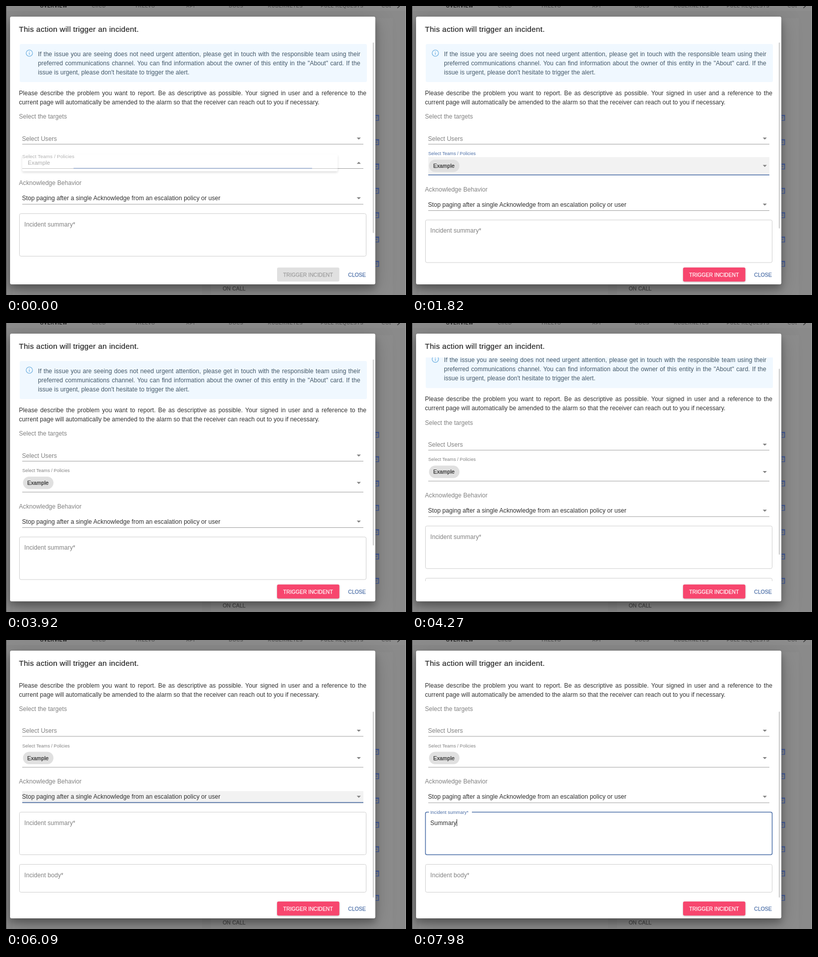
Animation of 788x570 px, one loop 8 s. Source, as an HTML page:

```html
<!DOCTYPE html>
<html lang="en">
<head>
<meta charset="utf-8">
<title>Trigger an incident</title>
<style>
  html, body { margin: 0; width: 100%; height: 100%; overflow: hidden; background: #8a8a8a; }
  svg { display: block; font: 12px "Liberation Sans", Arial, sans-serif; letter-spacing: .065px; }
  text { white-space: pre; }
  .ink { fill: #303030; }
  .hint { fill: #808080; }
  .tab { font-size: 9px; font-weight: 700; letter-spacing: .7px; fill: #585858; }
  .action { font-size: 10.25px; letter-spacing: 0; stroke-width: .25px; }
  .rule { stroke: #a0a0a0; }
  .focus { stroke: #4c6fa8; stroke-width: 1.5; }
  .box { fill: none; stroke: #d0d0d0; }
  .arrow { fill: #808080; }
  .paper { fill: #fff; filter: drop-shadow(0 3px 2.5px rgba(0,0,0,.32)); }
  .lines div { line-height: 18px; height: 18px; white-space: nowrap; text-align: justify; text-align-last: justify; }
  .lines div:last-child { text-align-last: left; }
</style>
</head>
<body>
<svg width="788" height="570" viewBox="0 0 788 570">
  <defs>
    <clipPath id="viewport"><rect x="8" y="68" width="719" height="441"/></clipPath>
    <clipPath id="tabStrip"><rect width="758" height="12"/></clipPath>
    <path id="down" class="arrow" d="M-4-1.9H4L0 2.1Z"/>
    <g id="exit" fill="none" stroke="#3f5285" stroke-width="1.6">
      <path d="M0-5H6.2V5H0"/><path d="M0-4.2H6" stroke-width="2.4"/><path d="M0 0H3.4"/>
    </g>
  </defs>

  <g id="page">
    <rect width="788" height="570" fill="#8a8a8a"/>
    <rect width="788" height="10" fill="#8d8d8d"/>
    <rect x="13" y="24" width="373" height="546" fill="#8d8d8d"/>
    <rect x="404" y="24" width="358" height="546" fill="#8d8d8d"/>
    <rect width="1" height="570" fill="#505050"/>
    <rect x="787" width="1" height="570" fill="#a0a0a0"/>
    <g id="tabs" clip-path="url(#tabStrip)"></g>
    <path d="M771-3L775 .5L771 4" fill="none" stroke="#333" stroke-width="1.4"/>
    <text x="427" y="560.5" font-size="10.25" style="letter-spacing:.15px" fill="#484848" stroke="#484848" stroke-width=".25">ON CALL</text>
  </g>

  <rect x="8" y="21" width="719.5" height="528" rx="3" fill="#fff"
        style="filter:drop-shadow(0 8px 7px rgba(0,0,0,.28)) drop-shadow(0 10px 20px rgba(0,0,0,.22))"/>
  <g id="exits"></g>
  <text x="25.5" y="51" font-size="15" style="letter-spacing:.3px" fill="#262626" stroke="#262626" stroke-width=".22">This action will trigger an incident.</text>

  <g clip-path="url(#viewport)">
    <g id="content">
      <rect x="27" y="75" width="684" height="75" rx="3" fill="#f0f8ff"/>
      <g fill="none" stroke="#64aade" stroke-width="1.1">
        <circle cx="46" cy="93" r="6.3"/><path d="M46 92V96.3M46 89.4V90.8"/>
      </g>
      <foreignObject x="63" y="86" width="635" height="56">
        <div xmlns="http://www.w3.org/1999/xhtml" class="lines" style="color:#435868">
          <div>If the issue you are seeing does not need urgent attention, please get in touch with the responsible team using their</div>
          <div>preferred communications channel. You can find information about the owner of this entity in the "About" card. If the</div>
          <div>issue is urgent, please don't hesitate to trigger the alert.</div>
        </div>
      </foreignObject>
      <foreignObject x="25.5" y="162.5" width="684.5" height="38">
        <div xmlns="http://www.w3.org/1999/xhtml" class="lines" style="color:#303030">
          <div>Please describe the problem you want to report. Be as descriptive as possible. Your signed in user and a reference to the</div>
          <div>current page will automatically be amended to the alarm so that the receiver can reach out to you if necessary.</div>
        </div>
      </foreignObject>
      <text class="hint" x="25.5" y="222.2">Select the targets</text>

      <text class="hint" x="31.5" y="265.7">Select Users</text>
      <path class="rule" d="M32 272.5H704"/>
      <use href="#down" x="695" y="261.5"/>

      <rect id="teamsFill" x="32" y="298" width="672" height="35" fill="#f2f2f2"/>
      <g id="chip">
        <rect x="33.5" y="303" width="60" height="24.5" rx="12.2" fill="#e0e0e0"/>
        <text x="42" y="319" font-size="10.5" style="letter-spacing:.15px" fill="#2b2b2b" stroke="#2b2b2b" stroke-width=".25">Example</text>
      </g>
      <text id="teamsLabel">Select Teams / Policies</text>
      <path id="teamsRule" class="rule"/>
      <path id="teamsFocus" class="focus"/>
      <use id="teamsArrow" href="#down"/>

      <g id="lower">
        <text class="hint" x="25.5" y="365.7">Acknowledge Behavior</text>
        <rect id="ackFill" x="32" y="380.5" width="672" height="23" fill="#f2f2f2"/>
        <text class="ink" x="31.5" y="395.7">Stop paging after a single Acknowledge from an escalation policy or user</text>
        <path class="rule" d="M32 403.5H704"/>
        <path id="ackFocus" class="focus"/>
        <use id="ackArrow" href="#down"/>

        <rect id="summaryBox" class="box" x="26.5" y="422" width="683" height="84" rx="3"/>
        <path id="notch" stroke="#fff" stroke-width="4"/>
        <text id="summaryLabel">Incident summary*</text>
        <text id="typed" class="ink" x="36" y="447"></text>
        <path id="caret" stroke="#222"/>

        <rect class="box" x="26.5" y="525" width="683" height="55" rx="3"/>
        <text class="hint" x="36" y="550">Incident body*</text>
      </g>
    </g>
  </g>

  <rect id="scrollbar" x="722.5" width="2.5" rx="1.2" fill="#d0d0d0"/>
  <rect id="button" x="534" y="515.7" width="122.7" height="27.7" rx="3"/>
  <text id="buttonText" class="action" x="546" y="533.7">TRIGGER INCIDENT</text>
  <text class="action" x="674" y="533.7" fill="#4c6fa8" stroke="#4c6fa8">CLOSE</text>

  <g id="teamsMenu">
    <rect class="paper" y="-19.5" width="672" height="39" rx="3"/>
    <text class="ink" x="12" y="4.2">Example</text>
  </g>
  <g id="ackMenu">
    <rect class="paper" y="-19.5" width="672" height="66" rx="3"/>
    <rect y="-13.5" width="672" height="27" fill="#ededed"/>
    <text class="ink" x="12" y="4.2">Stop paging after a single Acknowledge from an escalation policy or user</text>
    <text class="ink" x="12" y="31.2">Continue paging until each escalation policy or user above has acknowledged</text>
  </g>
</svg>

<script>
const LOOP = 8000;
const BLUE = '#4c6fa8', GREY = '#808080';
const when = {
  teamsOpen: -65, selected: 703, teamsClose: 1300, teamsBlur: 2730,
  scroll: 4130, ackOpen: 4690, ackClose: 5600, summary: 6440, typing: 7140
};

const el = {};
document.querySelectorAll('[id]').forEach(node => el[node.id] = node);

const tabs = { OVERVIEW: 67, 'CI/CD': 169, TRELVO: 254, API: 355, DOCS: 439,
  KUBERNETES: 516, 'PULL REQUESTS': 620, CODE: 740 };
el.tabs.innerHTML = Object.entries(tabs).map(([name, x], i) =>
  `<text class="tab" x="${x}" y="3"${i ? '' : ' style="fill:#1c1c1c"'}>${name}</text>`).join('');
el.exits.innerHTML = Array.from({ length: 7 }, (_, i) =>
  `<use href="#exit" x="728" y="${220.5 + 48 * i}"/>`).join('');

const progress = (t, start, length) => Math.min(1, Math.max(0, (t - start) / length));
const easeOut = x => 1 - (1 - x) ** 3;
const easeInOut = x => x * x * (3 - 2 * x);
const lerp = (a, b, p) => a + (b - a) * p;
const set = (node, attrs) => { for (const key in attrs) node.setAttribute(key, attrs[key]); };
const show = (node, on) => set(node, { visibility: on ? 'visible' : 'hidden' });

// Blends translucent black into an opaque colour, as premultiplied layers.
function fromShade(alpha, rgb, p) {
  const a = lerp(alpha, 1, p);
  return `rgba(${rgb.map(c => Math.round(c * p / a))},${a})`;
}

function floatLabel(node, x, from, to, p, focused) {
  const scale = lerp(1, .75, p);
  set(node, {
    transform: `translate(${x} ${lerp(from, to, p) + 4.2 * scale}) scale(${scale})`,
    fill: focused ? BLUE : GREY
  });
}

function focusLine(node, y, t, open, blur) {
  const half = 336 * easeOut(progress(t, open, 200));
  show(node, t > open && t < blur);
  set(node, { d: `M${368 - half} ${y}H${368 + half}` });
}

function menu(node, y, t, open, close) {
  const leaving = progress(t, close, 180);
  const scale = lerp(.75, 1, easeOut(progress(t, open, 200)) - easeInOut(leaving));
  show(node, t > open && leaving < 1);
  set(node, {
    transform: `translate(32 ${y}) scale(${scale} ${scale * scale})`,
    opacity: progress(t, open, 165) * (1 - leaving)
  });
}

const arrow = (node, y, up) => set(node, { transform: `translate(695 ${y}) scale(1 ${up ? -1 : 1})` });

function draw(t) {
  const selected = t >= when.selected;
  const shift = selected ? 0 : -12.5;
  const fieldY = selected ? 315.5 : 309.3;
  const teamsRuleY = selected ? 333.5 : 320.5;

  show(el.chip, selected);
  show(el.teamsFill, t >= when.teamsClose && t < when.teamsBlur);
  floatLabel(el.teamsLabel, 32, 309.5, 291, easeOut(progress(t, when.teamsOpen, 200)),
    t > 60 && t < when.teamsBlur);
  set(el.teamsRule, { d: `M32 ${teamsRuleY}H704` });
  focusLine(el.teamsFocus, teamsRuleY - .3, t, when.teamsOpen, when.teamsBlur);
  arrow(el.teamsArrow, fieldY, t < when.teamsClose);
  menu(el.teamsMenu, fieldY, t, when.teamsOpen, when.teamsClose);

  const enabled = easeInOut(progress(t, when.selected, 250));
  const white = fromShade(.26, [255, 255, 255], enabled);
  set(el.button, { fill: fromShade(.12, [247, 70, 110], enabled) });
  el.button.style.filter = enabled ? `drop-shadow(0 1px 1.5px rgba(0,0,0,${.25 * enabled}))` : 'none';
  set(el.buttonText, { fill: white, stroke: white });

  const scroll = 82.5 * easeInOut(progress(t, when.scroll, 420));
  const view = 436, total = view + 82.5 + shift;
  set(el.content, { transform: `translate(0 ${-scroll})` });
  set(el.lower, { transform: `translate(0 ${shift})` });
  set(el.scrollbar, { y: 72 + scroll * view / total, height: view * view / total });

  show(el.ackFill, t >= when.ackClose && t < when.summary);
  focusLine(el.ackFocus, 403, t, when.ackOpen, when.summary);
  arrow(el.ackArrow, 391.7, t >= when.ackOpen && t < when.ackClose);
  menu(el.ackMenu, 309.2, t, when.ackOpen, when.ackClose);

  const writing = t >= when.summary;
  const raised = easeOut(progress(t, when.summary, 200));
  floatLabel(el.summaryLabel, 36, 443, 422, raised, writing);
  el.summaryBox.style.stroke = writing ? BLUE : '';
  el.summaryBox.style.strokeWidth = writing ? 1.5 : '';
  show(el.notch, writing);
  set(el.notch, { d: `M33.5 422H${33.5 + 84.5 * raised}` });

  const letters = t < when.typing ? 0 : Math.floor((t - when.typing) / 128) + 1;
  el.typed.textContent = 'Summary'.slice(0, letters);
  const caretX = 36.5 + (letters ? el.typed.getComputedTextLength() : 0);
  show(el.caret, writing && (letters || (t - when.summary) % 1000 < 500));
  set(el.caret, { d: `M${caretX} 436V449.5` });
}

const start = performance.now();
function tick() {
  draw((performance.now() - start) % LOOP);
  requestAnimationFrame(tick);
}
tick();
</script>
</body>
</html>
```
